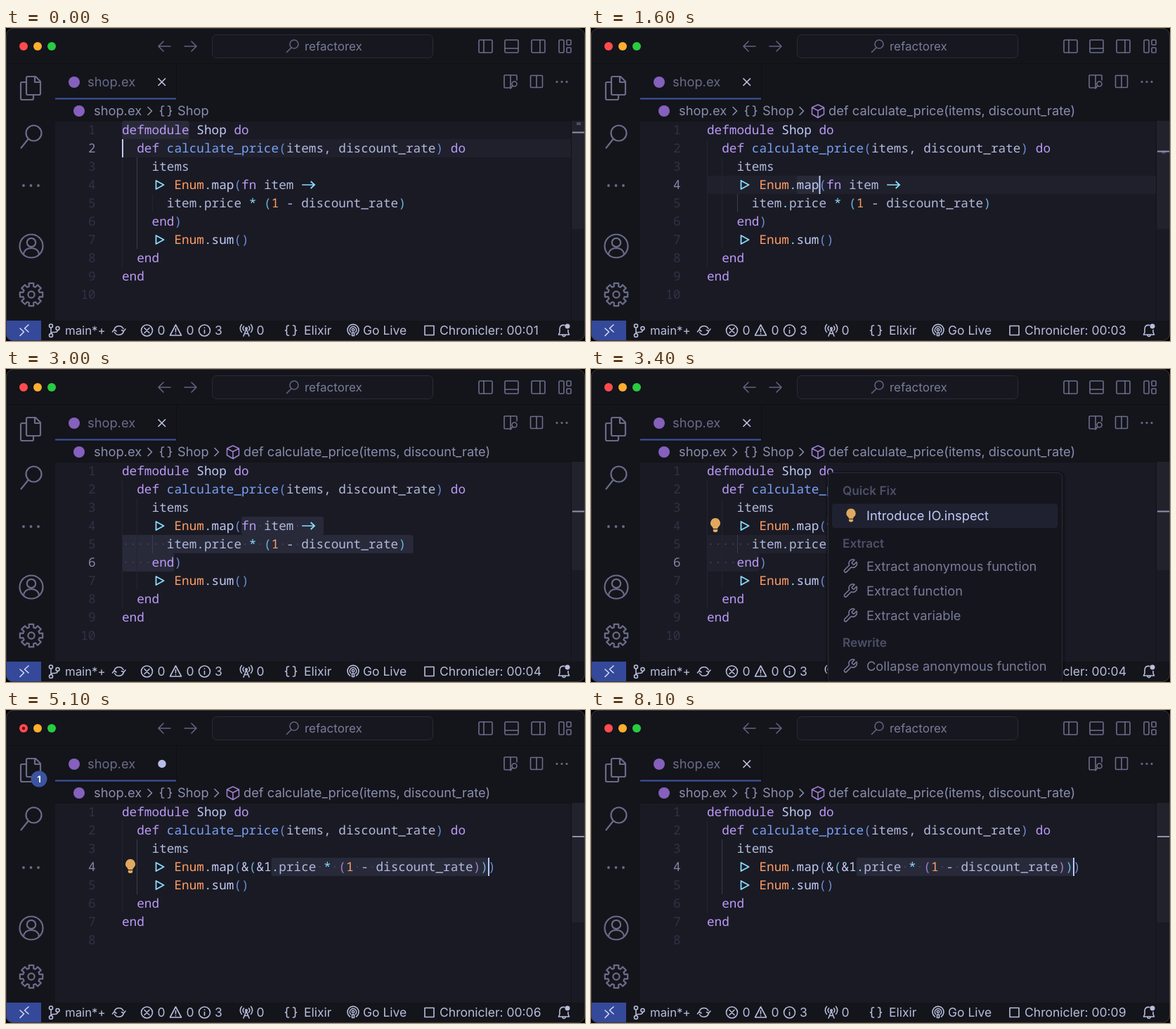
An HTML page that plays this animation: 824x445 px, repeating every 8.2 s.

```html
<!DOCTYPE html>
<html lang="en">
<head>
<meta charset="utf-8">
<title>Editor refactoring</title>
<style>
html, body { margin: 0; width: 100%; height: 100%; overflow: hidden; background: #000; }
svg { display: block; width: 824px; height: 445px; }
text { font: 18.3px Inter, "Open Sans", sans-serif; white-space: pre; text-rendering: geometricPrecision; stroke: none; }
.code text { font: 17.72px "Noto Sans Mono", "DejaVu Sans Mono", monospace; font-variant-ligatures: none; }
.icons { fill: none; stroke-width: 1.6; stroke-linecap: round; stroke-linejoin: round; }
.status text { font-size: 17.5px; fill: #b8bedb; }
.menu text { fill: #787c99; }
.menu .head { font-size: 17.2px; font-weight: 600; fill: #4d5069; }
.menu .on { fill: #c0caf5; }
</style>
</head>
<body>
<svg viewBox="0 0 824 445" xmlns="http://www.w3.org/2000/svg">
  <defs>
    <path id="wrench" d="M14.7 6.3a1 1 0 0 0 0 1.4l1.6 1.6a1 1 0 0 0 1.4 0l3.77-3.77a6 6 0 0 1-7.94 7.94l-6.91 6.91a2.12 2.12 0 0 1-3-3l6.91-6.91a6 6 0 0 1 7.94-7.94z"/>
    <g id="bulb" fill="#e0a95e" stroke="none">
      <path d="M0 -10a7 7 0 0 1 4.4 12.4q-1.2 1-1.2 2.6h-6.4q0-1.600-1.2-2.600a7 7 0 0 1 4.400-12.400z"/>
      <path d="M-3.2 6h6.400v1.500a2.500 2.500 0 0 1-2.500 2.500h-1.400a2.500 2.500 0 0 1-2.500-2.500z"/>
    </g>
    <path id="braces" d="M-3 -7h-1q-2 0-2 2v3q0 2-2 2q2 0 2 2v3q0 2 2 2h1M3 -7h1q2 0 2 2v3q0 2 2 2q-2 0-2 2v3q0 2-2 2h-1"/>
    <path id="chev" d="M-3 -5.500l5.500 5.500-5.500 5.500"/>
    <clipPath id="win"><rect width="824" height="445" rx="10"/></clipPath>
  </defs>

  <g clip-path="url(#win)">
    <rect width="824" height="445" fill="#14141b"/>
    <path d="M70 132H824V416H70z" fill="#1a1a24"/>
    <path d="M0 50.500H824M242.500 51V101" stroke="#0e0e13"/>
    <path d="M70 132.500H804" stroke="#121218"/>
    <path d="M70 100.500H242" stroke="#3d59a1" stroke-width="2"/>

    <!-- title bar -->
    <circle cx="25" cy="26" r="6" fill="#ff4b4e"/>
    <circle cx="45" cy="26" r="6" fill="#ffae2e"/>
    <circle cx="65" cy="26" r="6" fill="#28cc42"/>
    <circle id="edited" cx="25" cy="26" r="2.200" fill="#6d0f12"/>
    <rect x="293.500" y="9.500" width="314" height="33" rx="6" fill="#17171f" stroke="#2a2b38"/>
    <text x="425" y="32" style="font-size:17px" fill="#787c99">refactorex</text>
    <g class="icons" stroke="#5f6380">
      <path d="M234 26H217m7-7-7 7 7 7M254 26h17m-7-7 7 7-7 7"/>
      <circle cx="410" cy="23" r="6"/><path d="M406 28l-6.500 6.500"/>
    </g>
    <g class="icons" stroke="#6a6e8b">
      <rect x="673" y="17" width="19" height="18" rx="1.500"/><path d="M680 17v18"/>
      <rect x="710" y="17" width="19" height="18" rx="1.500"/><path d="M710 29h19"/>
      <rect x="748" y="17" width="19" height="18" rx="1.500"/><path d="M760 17v18"/>
      <rect x="787" y="17" width="7" height="18" rx="1.500"/><rect x="798" y="17" width="6" height="7" rx="1"/><rect x="798" y="28" width="6" height="7" rx="1"/>
      <path d="M718 67h-8q-1 0-1 1v16q0 1 1 1h8M718 67v18M718 67h8q1 0 1 1v6"/>
      <circle cx="723.500" cy="79.500" r="3.500"/><path d="M721 82l-3 4"/>
      <rect x="746.500" y="67.500" width="17" height="17" rx="1"/><path d="M755 67.500v17"/>
    </g>
    <g fill="#6a6e8b"><circle cx="784" cy="76.500" r="1.500"/><circle cx="791" cy="76.500" r="1.500"/><circle cx="798" cy="76.500" r="1.500"/></g>

    <!-- tab and breadcrumbs -->
    <circle cx="97" cy="77" r="8" fill="#8560bd"/>
    <text x="116" y="83" fill="#686c88">shop.ex</text>
    <path id="close" d="M216.500 71.500l10.500 10.500m0-10.500l-10.500 10.500" stroke="#c0c6e2" stroke-width="1.600"/>
    <circle id="dirty" cx="222" cy="76.500" r="5.700" fill="#b4bde8"/>
    <circle cx="104" cy="118" r="8" fill="#8560bd"/>
    <g fill="#888ead">
      <text x="125" y="124">shop.ex</text><text x="244" y="124">Shop</text>
    </g>
    <g class="icons" stroke="#888ead">
      <use href="#chev" x="205" y="118"/><use href="#braces" x="227.500" y="118"/>
    </g>
    <g id="crumb" class="icons">
      <use href="#chev" x="300" y="118" stroke="#888ead"/>
      <path d="M323 109l8.500 4v9.500l-8.500 5-8.500-5v-9.500zM314.500 113l8.500 4.500 8.500-4.500M323 117.500v10" stroke="#9a7ecc"/>
      <text x="338" y="124" fill="#888ead">def calculate_price(items, discount_rate)</text>
    </g>

    <!-- activity bar -->
    <g class="icons" stroke="#686c88" stroke-width="2" style="stroke-width:2.200">
      <path d="M31 69h11l7 7v17q0 2-2 2H31q-2 0-2-2V71q0-2 2-2zM41 69v8h8M29 77h-6q-2 0-2 2v21q0 2 2 2h14q2 0 2-2v-5"/>
      <circle cx="39.500" cy="149.500" r="11"/><path d="M31.500 158l-10 12.500"/>
      <circle cx="36" cy="310" r="16.500"/><circle cx="36" cy="305" r="6.200"/><path d="M25 322q1-9 11-9t11 9"/>
      <path id="gear"/><circle cx="36" cy="379" r="4.600"/>
    </g>
    <g fill="#686c88"><circle cx="25" cy="224" r="1.900"/><circle cx="35.500" cy="224" r="1.900"/><circle cx="46" cy="224" r="1.900"/></g>
    <g id="badge">
      <circle cx="47" cy="98" r="11.500" fill="#3b54a0"/>
      <text x="47" y="102.500" text-anchor="middle" style="font-size:13px;font-weight:700" fill="#fff">1</text>
    </g>

    <!-- editor -->
    <g class="code">
      <g id="under"></g>
      <g id="before"></g>
      <g id="after"></g>
      <g id="over"></g>
    </g>

    <!-- status bar -->
    <path d="M0 416H824V445H0z" fill="#14141b"/>
    <path d="M0 416H50V445H0z" fill="#34499a"/>
    <g class="icons" stroke="#d5daf0"><path d="M20 427l5.500 5-5.500 5.500M32 422l-5.500 5 5.500 5"/></g>
    <g class="icons" stroke="#b8bedb">
      <circle cx="64" cy="423.500" r="2.500"/><circle cx="64" cy="437" r="2.500"/><circle cx="73.500" cy="427" r="2.500"/><path d="M64 426v8.500M73.500 429.500q0 3-4 3h-2q-3.500 0-3.500 2"/>
      <path d="M154 429a7 7 0 0 1 13-1.500M167.500 431a7 7 0 0 1-13 1.500M164.500 429.500l3 1.500 2.500-3M151.500 432l2.500-3 3 2"/>
      <circle cx="200.500" cy="430" r="8"/><path d="M197 426.500l7 7m0-7l-7 7"/>
      <path d="M241.500 422l8 15h-16zM241.500 427.500v4.500M241.500 434.500v.2"/>
      <circle cx="282.500" cy="430" r="8"/><path d="M282.500 429.500v4.500M282.500 426v.2"/>
      <path d="M338 438l4-10 4 10M339.500 434.500h5M338.500 430a4.500 4.500 0 0 1 0-6M345.500 430a4.500 4.500 0 0 0 0-6M335.500 432.500a8 8 0 0 1 0-11M348.500 432.500a8 8 0 0 0 0-11"/><circle cx="342" cy="427" r="1.300"/>
      <use href="#braces" x="405.500" y="430"/>
      <circle cx="494" cy="429" r="1.700"/><path d="M492.500 433h3v4.500h-3zM490.500 432.500a4.700 4.700 0 1 1 7 0M489.500 436a8 8 0 1 1 9 0"/>
      <rect x="596" y="423.500" width="13" height="13"/>
      <path d="M795 422.500q-6.500-1-7 5v5l-1.500 3.500h15l-1.500-3.500v-3M792 436.500q0 2 2 2t2-2"/><circle cx="799" cy="424" r="2.700" fill="#b8bedb"/>
    </g>
    <g class="status">
      <text x="84" y="436" style="font-size:16.800px">main*+</text>
      <text x="215.500" y="436">0</text><text x="256.500" y="436">0</text><text x="297" y="436">3</text><text x="356.500" y="436">0</text>
      <text x="424" y="436">Elixir</text><text x="508" y="436">Go Live</text>
      <text id="clock" x="617" y="436"></text>
    </g>

    <g id="menu" class="menu"></g>
  </g>
  <rect x=".5" y=".5" width="823" height="444" rx="10" fill="none" stroke="#3b3b43"/>
</svg>

<script>
const LOOP = 8200, ADV = 10.632, LEFT = 165;
const $ = id => document.getElementById(id);
const X = col => LEFT + col * ADV;
const Y = line => 145 + 26 * (line - 1);
const show = (id, on) => $(id).style.display = on ? '' : 'none';

const head = ['defmodule Shop do', '  def calculate_price(items, discount_rate) do', '    items'];
const tail = ['    |> Enum.sum()', '  end', 'end', ''];
const docs = {
  before: [...head, '    |> Enum.map(fn item ->', '      item.price * (1 - discount_rate)', '    end)', ...tail],
  after: [...head, '    |> Enum.map(&(&1.price * (1 - discount_rate)))', ...tail]
};

const parens = ['#698cd6', '#68b3de', '#9a7ecc'];
const tokens = /\|>|->|&1?|\w+|[.*()\-,]/g;

function colour(tok) {
  if (/^(defmodule|def|do|end|fn)$/.test(tok)) return '#bb9af7';
  if (tok === 'calculate_price') return '#7aa2f7';
  if (/^(Enum|1)$/.test(tok)) return '#ff9e64';
  if (/^[.*]$/.test(tok)) return '#89ddff';
  if (/^(Shop|map|sum|&1?)$/.test(tok)) return '#c0caf5';
  return '#b1b9dc';
}

function paint(lines) {
  let depth = 0;
  return lines.map((src, i) => [...src.matchAll(tokens)].map(m => {
    const tok = m[0], x = X(m.index), y = Y(i + 1);
    if (tok === '|>') return `<path d="M${x + 6} ${y - 6}l11 6-11 6z" fill="none" stroke="#89ddff" stroke-width="1.8" stroke-linejoin="round"/>`;
    if (tok === '->') return `<path d="M${x + 1} ${y}h18m-5.500-5l5.500 5-5.500 5" fill="none" stroke="#89ddff" stroke-width="1.7"/>`;
    let fill = colour(tok);
    if (tok === '(') fill = parens[depth++ % 3];
    if (tok === ')') fill = parens[--depth % 3];
    return `<text x="${x}" y="${y + 6}" fill="${fill}">${tok.replace('&', '&amp;')}</text>`;
  }).join('')).join('');
}

// Each step overrides the state from its time on.
const selFn = [4, 16, 27], selBody = [5, 0, 39];
const steps = [
  [0, { doc: 'before', line: 2, col: 0, cur: 1, sel: [], words: [[1, 0, 9]], crumb: 0, sec: 1, bulb: 0, focus: -1, dirty: 0, edited: 0 }],
  [100, { words: [] }],
  [200, { line: 3 }],
  [400, { crumb: 1, sec: 2 }],
  [500, { line: 4 }],
  [900, { col: 6 }],
  [1100, { col: 11 }],
  [1300, { words: [[4, 7, 11], [7, 7, 11]] }],
  [1400, { col: 15, words: [], sec: 3 }],
  [1600, { words: [[4, 12, 15]] }],
  [1700, { col: 16, words: [] }],
  [2000, { line: 5, sel: [selFn, [5, 0, 16]] }],
  [2200, { line: 6, col: 8, sel: [selFn, selBody, [6, 0, 8]] }],
  [2500, { col: 7, sel: [selFn, selBody, [6, 0, 7]], sec: 4 }],
  [3000, { cur: 0 }],
  [3300, { bulb: 1 }],
  [3400, { focus: 0 }],
  [3500, { sec: 5 }],
  [4200, { focus: 1 }],
  [4300, { focus: 2 }],
  [4400, { focus: 3 }],
  [4500, { focus: 4, sec: 6 }],
  [5100, { doc: 'after', focus: -1, line: 4, col: 49, cur: 1, sel: [[4, 20, 49]], dirty: 1, edited: 1 }],
  [5500, { dirty: 0, bulb: 0, sec: 7 }],
  [5600, { cur: 0 }],
  [6100, { cur: 1, edited: 0 }],
  [6500, { sec: 8 }],
  [6600, { cur: 0 }],
  [7100, { cur: 1 }],
  [7500, { sec: 9 }],
  [7600, { cur: 0 }],
  [8100, { cur: 1 }]
];

const bar = (cls, [line, a, b]) =>
  `<rect x="${X(a)}" y="${Y(line) - 13}" width="${(b - a) * ADV}" height="26" rx="3" fill="${cls}"/>`;

const guide = (col, from, to, on) =>
  `<path d="M${Math.round(X(col)) + .5} ${Y(from) - 13}V${Y(to) + 13}" stroke="${on ? '#3a3c50' : '#23242f'}"/>`;

function under(s) {
  const lines = docs[s.doc], last = lines.length, long = s.doc === 'before';
  let out = '';
  if (!s.sel.length) out += `<rect x="165" y="${Y(s.line) - 13}" width="639" height="26" fill="#1f202c"/>`;
  out += s.words.map(w => bar('#292a38', w)).join('');
  out += s.sel.map(r => bar(s.focus < 0 ? '#282a3a' : '#20212c', r)).join('');
  out += guide(0, 2, last - 2) + guide(2, 3, last - 3, !long || s.line < 4);
  if (long) out += guide(4, 5, 5, s.line > 3);
  for (const [line, a, b] of s.sel)
    for (let c = a; c < b; c++)
      if (lines[line - 1][c] === ' ') out += `<circle cx="${X(c + .5)}" cy="${Y(line)}" r="1.1" fill="#41445a"/>`;
  lines.forEach((_, i) => {
    out += `<text x="127.500" y="${Y(i + 1) + 6}" text-anchor="end" fill="${i + 1 === s.line ? '#8288a8' : '#2f3247'}">${i + 1}</text>`;
  });
  return out;
}

function over(s) {
  const long = s.doc === 'before', gap = long ? 13.5 : 15, mark = n => 135 + gap * (n - 1);
  let out = `<path d="M804.500 132V416" stroke="#121218"/><rect x="805" y="132" width="18" height="${long ? 154 : 170}" fill="#7a7f9c" opacity=".08"/>`;
  out += s.words.map(w => `<rect x="812" y="${mark(w[0]) - 1}" width="6" height="4" fill="#4a4d62"/>`).join('');
  out += `<rect x="806" y="${mark(s.line) - 1}" width="17" height="2" fill="#8e93ab"/>`;
  if (s.bulb) out += `<use href="#bulb" x="177" y="222"/>`;
  if (s.cur) out += `<rect x="${X(s.col)}" y="${Y(s.line) - 13}" width="2" height="26" fill="#c0caf5"/>`;
  return out;
}

const heads = [['Quick Fix', 173], ['Extract', 248], ['Rewrite', 389]];
const items = [['Introduce IO.inspect', 209], ['Extract anonymous function', 281], ['Extract function', 316],
  ['Extract variable', 351], ['Collapse anonymous function', 423]];

function menu(focus) {
  if (focus < 0) return '';
  let out = '<rect x="334" y="145" width="341" height="306" rx="9" fill="#000" opacity=".22"/>' +
    '<rect x="337.500" y="147.500" width="333" height="299" rx="6" fill="#15151d" stroke="#2b2c39"/>' +
    `<rect x="343" y="${items[focus][1] - 17.5}" width="321" height="34.500" rx="4" fill="#1f2130"/>`;
  for (const [name, y] of heads) out += `<text class="head" x="358" y="${y + 6}">${name}</text>`;
  items.forEach(([name, y], i) => {
    out += i ? `<use href="#wrench" class="icons" stroke="${i === focus ? '#c0caf5' : '#787c99'}" transform="translate(357.500 ${y - 12}) scale(.95)"/>`
      : `<use href="#bulb" transform="translate(370 ${y - 1}) scale(.95)"/>`;
    out += `<text x="392" y="${y + 6}" class="${i === focus ? 'on' : ''}">${name}</text>`;
  });
  return out;
}

function draw(s) {
  $('under').innerHTML = under(s);
  $('over').innerHTML = over(s);
  $('menu').innerHTML = menu(s.focus);
  $('clock').textContent = 'Chronicler: 00:0' + s.sec;
  show('before', s.doc === 'before');
  show('after', s.doc === 'after');
  show('crumb', s.crumb);
  show('dirty', s.dirty);
  show('badge', s.dirty);
  show('close', !s.dirty);
  show('edited', s.edited);
}

function gear() {
  const pts = [];
  for (let i = 0; i < 8; i++)
    for (const [off, r] of [[-.27, 12], [-.2, 16.5], [.2, 16.5], [.27, 12]]) {
      const a = i * Math.PI / 4 + off;
      pts.push((36 + r * Math.cos(a)).toFixed(1) + ' ' + (379 + r * Math.sin(a)).toFixed(1));
    }
  return 'M' + pts.join('L') + 'z';
}

$('gear').setAttribute('d', gear());
for (const id in docs) $(id).innerHTML = paint(docs[id]);

const start = performance.now();
let shown = 0;
function tick() {
  const t = (performance.now() - start) % LOOP;
  const past = steps.filter(([at]) => at <= t);
  if (past.length !== shown) {
    shown = past.length;
    draw(Object.assign({}, ...past.map(p => p[1])));
  }
  requestAnimationFrame(tick);
}
tick();
</script>
</body>
</html>
```
